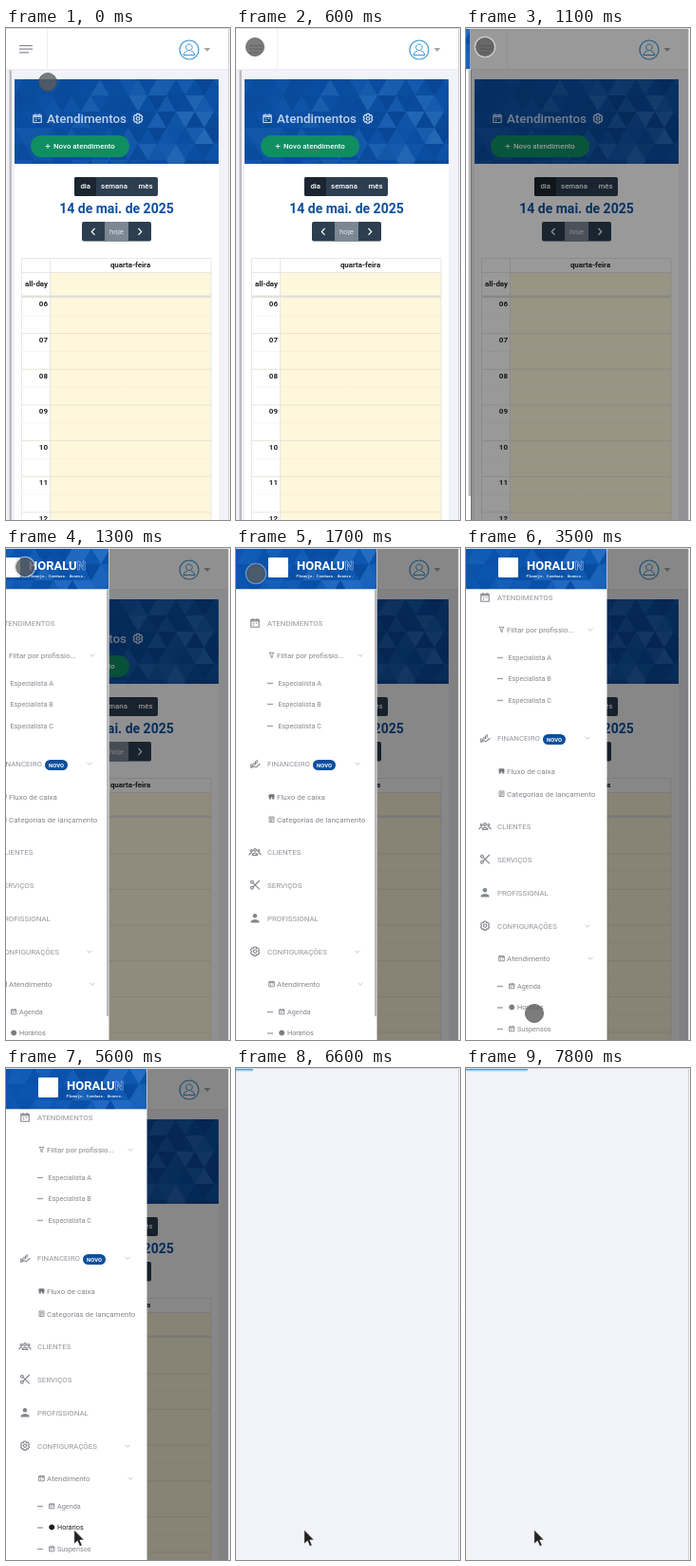
An HTML page that plays this animation: 236x518 px, repeating every 8 s.

```html
<!DOCTYPE html>
<html lang="pt-BR">
<head>
<meta charset="utf-8">
<title>Agenda</title>
<style>
  html, body { margin: 0; width: 100%; height: 100%; overflow: hidden; background: #f2f3f8; }
  svg { display: block; width: 100vw; height: 100vh; }
  text { font-family: Roboto, sans-serif; white-space: pre; }
</style>
</head>
<body>
<svg id="stage" viewBox="0 0 236 518" preserveAspectRatio="none">
  <defs>
    <clipPath id="screen"><rect y="1" width="234" height="517"/></clipPath>
    <clipPath id="heroClip"><rect x="9" y="54" width="215" height="89"/></clipPath>
    <clipPath id="brandClip"><rect width="148" height="43.5"/></clipPath>
  </defs>
  <rect width="236" height="518" fill="#f2f3f8"/>
  <g clip-path="url(#screen)">
    <g id="app">
      <g id="page"></g>
      <rect id="shade" width="234" height="518"/>
      <g id="sidebar">
        <rect width="148.5" height="518" fill="#fff"/>
        <g id="menu"></g>
        <g id="brand" clip-path="url(#brandClip)"></g>
        <rect id="thumb" x="146" y="44" width="2.5" height="449" fill="#b9babd"/>
      </g>
    </g>
    <g id="loader">
      <rect id="bar" y="1" height="1.6" fill="#4f9bd6"/>
      <rect id="glow" y="2.6" height="1" fill="#c3dcf0"/>
    </g>
    <g id="touch">
      <circle r="9.5" fill="#5c5c5c" stroke="#4a4a4a"/>
      <circle id="ring" r="10.6" fill="none" stroke="#d4d8dc" stroke-width="1.4"/>
    </g>
    <path id="arrow" d="M71.7 486v15.4l3.6-3.3 2.4 5.6 2.6-1.1-2.4-5.5h4.6z" fill="#222" stroke="#fff" stroke-width=".8"/>
  </g>
  <path d="M0 .5H236" stroke="#dcdcde"/>
  <path d="M234.5 0V518" stroke="#d2d2d6"/>
  <path d="M235.5 0V518" stroke="#f4f4f6"/>
</svg>
<script>
const $ = id => document.getElementById(id);
const page = $('page'), menu = $('menu'), brand = $('brand');

function add(parent, tag, attrs, content) {
  const el = document.createElementNS('http://www.w3.org/2000/svg', tag);
  for (const key in attrs) el.setAttribute(key, attrs[key]);
  if (content) el.textContent = content;
  parent.append(el);
  return el;
}
const rect = (parent, x, y, width, height, fill, more) =>
  add(parent, 'rect', { x, y, width, height, fill, ...more });
const line = (parent, d, stroke, width = 1, more) =>
  add(parent, 'path', { d, stroke, fill: 'none', 'stroke-width': width, ...more });
const label = (parent, x, y, size, fill, str, more) =>
  add(parent, 'text', { x, y, 'font-size': size, fill, ...more }, str);
const BOLD = { 'font-weight': 700 }, MEDIUM = { 'font-weight': 500 };
const MIDDLE = { 'text-anchor': 'middle' }, END = { 'text-anchor': 'end' };

// Outline icons in a 10 x 10 box; solid ones are filled.
const ICONS = {
  calendar: { d: 'M1 2H9V9.3H1ZM1 3.4H9M3 .5V2M7 .5V2M3 5.5H4.4M5.8 5.5H7.2M3 7.4H4.4' },
  funnel: { d: 'M1.5 1.5H8.5L6 5V9L4 8V5Z' },
  chart: { d: 'M1 5.5V9M4 4V7M7 1.5V5M.5 9.5L4 8L6 9L10 5.5M2.5 6V8M5.5 3V6.5' },
  shop: { d: 'M1 1.5H9V3L10 5H9V9H6V6H4V9H1V5H0L1 3Z', solid: true },
  list: { d: 'M1.5 1H8.5V9H1.5ZM3 3.5H7M3 5.2H7M3 7H5.5' },
  people: { d: 'M5 2A1.3 1.3 0 1 0 5.1 2M1.4 3A1 1 0 1 0 1.5 3M8.6 3A1 1 0 1 0 8.7 3M2.5 8.5V7.5Q5 5 7.5 7.5V8.5ZM-.7 8.5V7.5Q.6 6 2 6.5M10.7 8.5V7.5Q9.4 6 8 6.5' },
  scissors: { d: 'M2 .8A1.3 1.3 0 1 0 2.1 .8M2 6.6A1.3 1.3 0 1 0 2.1 6.6M3 3L9.6 9.5M3 7.2L9.6 .5' },
  person: { d: 'M5 .5A2.2 2.2 0 1 1 4.9 .5M.8 9.5V8Q5 4.6 9.2 8V9.5Z', solid: true },
  gear: { d: 'M4 .5H6L6.4 2L7.8 1.6L9.3 3.6L8.4 5L9.3 6.4L7.8 8.4L6.4 8L6 9.5H4L3.6 8L2.2 8.4L.7 6.4L1.6 5L.7 3.6L2.2 1.6L3.6 2ZM5 3.4A1.6 1.6 0 1 0 5.1 3.4' },
  clock: { d: 'M5 .5A4.5 4.5 0 1 0 5.1 .5', solid: true },
};
function icon(parent, name, cx, cy, size, color) {
  const { d, solid } = ICONS[name], k = size / 10;
  return add(parent, 'path', {
    d, fill: solid ? color : 'none', stroke: solid ? 'none' : color, 'stroke-width': 1.1,
    transform: `translate(${cx - size / 2} ${cy - size / 2}) scale(${k})`,
  });
}
const chevron = (parent, x, y) => line(parent, `M${x - 2.6} ${y - 1.3}l2.6 2.6 2.6-2.6`, '#b4b6bc', .8);

// Blue panel covered with seeded translucent triangles.
function triangles(parent, x, y, width, height, seed, color) {
  rect(parent, x, y, width, height, color);
  const random = () => (seed = seed * 16807 % 2147483647) / 2147483647;
  const w = 20, h = 17;
  for (let row = 0; row * h < height; row++) {
    for (let col = -1; col * w / 2 < width; col++) {
      const up = (row + col) % 2 === 0;
      const left = x + col * w / 2, top = y + row * h + (up ? h : 0);
      const light = random() < .55, strength = random() * (.04 + .1 * col * w / 2 / width);
      add(parent, 'path', {
        d: `M${left} ${top}h${w}l${-w / 2} ${up ? -h : h}z`,
        fill: light ? '#7fc0ff' : '#00245f', 'fill-opacity': Math.max(0, strength) * 1.8,
      });
    }
  }
}

function buildPage() {
  rect(page, 0, 0, 234, 518, '#f2f3f8');
  rect(page, 3.5, 44, 2.5, 474, '#bdbdc1');
  rect(page, 0, 0, 234, 43.5, '#fff');
  line(page, 'M0 44H234', '#e6e7ec');
  line(page, 'M43.5 0V43', '#eeeff3');
  line(page, 'M14 18.6H28M14 22.2H28M14 25.8H24', '#8b8f96', 1.3);
  add(page, 'circle', { cx: 193, cy: 23, r: 10, fill: '#fff', stroke: '#3c9ad6', 'stroke-width': 1.2 });
  line(page, 'M193 17a3.3 3.3 0 1 1-.1 0M187 28.5q1-4 4-4.4M199 28.5q-1-4-4-4.4M187 28.5h12', '#3c9ad6');
  add(page, 'path', { d: 'M208.500 21h7l-3.500 4z', fill: '#a6a8ae' });

  const hero = add(page, 'g', { 'clip-path': 'url(#heroClip)' });
  triangles(hero, 9, 54, 215, 89, 4711, '#0b4fa3');
  icon(hero, 'calendar', 33, 95, 10.5, '#c3d5ee');
  label(hero, 43, 100, 13.4, '#bfd2ee', 'Atendimentos', MEDIUM);
  icon(hero, 'gear', 139, 95.3, 11, '#d5e2f4');
  rect(hero, 26, 113, 104, 23, '#0f8e62', { rx: 11.5 });
  line(hero, 'M41.500 124.500h5M44 122v5', '#fff', .8);
  label(hero, 50, 127.3, 7.9, '#fff', 'Novo atendimento', MEDIUM);

  rect(page, 9, 143, 215, 375, '#fff');
  rect(page, 72, 157, 88, 20, '#2c3e50', { rx: 2 });
  rect(page, 72, 157, 23, 20, '#1a252f', { rx: 2 });
  [['dia', 83.7], ['semana', 114], ['mês', 147]].forEach(([name, x]) =>
    label(page, x, 169.3, 7.8, '#fff', name, { ...MEDIUM, ...MIDDLE }));
  label(page, 116.5, 195, 14, '#0d4f9f', '14 de mai. de 2025', { ...BOLD, ...MIDDLE });
  rect(page, 80, 204, 73, 20.5, '#2c3e50', { rx: 2 });
  rect(page, 104, 204, 25, 20.5, '#7b8793');
  label(page, 116.5, 217, 8, '#e4e7ea', 'hoje', MIDDLE);
  line(page, 'M93.500 211l-3.200 3.400 3.200 3.400M139.500 211l3.200 3.400-3.200 3.400', '#fff', 1.2);

  rect(page, 46.5, 257, 169.5, 261, '#fff7dc');
  label(page, 131, 252.3, 7.9, '#222', 'quarta-feira', { ...BOLD, ...MIDDLE });
  label(page, 44, 272, 7.9, '#222', 'all-day', { ...BOLD, ...END });
  line(page, 'M16.500 518V242.500H216V518M46.500 242V518M16 257.500H216', '#e3e3e3', .8);
  rect(page, 16.5, 281.5, 199.5, 2.5, '#e2e1da');
  for (let i = 0; i < 7; i++) {
    const y = 284 + i * 37.65;
    if (i) line(page, `M16.500 ${y}H216`, '#e3e0d2', .8);
    line(page, `M16.500 ${y + 18.8}H216`, '#e9e5d5', .7, { 'stroke-dasharray': '1 1' });
    label(page, 44, y + 9.2, 8, '#222', String(6 + i).padStart(2, '0'), { ...BOLD, ...END });
  }
}

const GREY = '#93959c';
let hoverParts;
function buildMenu() {
  const sections = [
    ['ATENDIMENTOS', 79, 'calendar'], ['FINANCEIRO', 227, 'chart', true], ['CLIENTES', 320, 'people'],
    ['SERVIÇOS', 355, 'scissors'], ['PROFISSIONAL', 390, 'person'], ['CONFIGURAÇÕES', 425, 'gear', true],
  ];
  for (const [name, y, glyph, opens] of sections) {
    icon(menu, glyph, 20, y - .3, 10.5, '#85878e');
    label(menu, 33, y + 2.9, 7.9, GREY, name);
    if (opens) chevron(menu, 128, y);
  }
  rect(menu, 81, 223, 24, 11, '#0d4f9f', { rx: 5.5 });
  label(menu, 93, 230.6, 5.8, '#fff', 'NOVO', { ...BOLD, ...MIDDLE });

  const groups = [
    ['Filtar por profissio...', 113, 'funnel', true], ['Fluxo de caixa', 262, 'shop'],
    ['Categorias de lançamento', 286, 'list'], ['Atendimento', 459, 'calendar', true],
  ];
  for (const [name, y, glyph, opens] of groups) {
    icon(menu, glyph, 37.5, y - .2, 7, '#74767d');
    label(menu, 43, y + 2.9, 8, '#85878e', name);
    if (opens) chevron(menu, 131, y);
  }

  const leaves = [
    ['Especialista A', 142], ['Especialista B', 164], ['Especialista C', 187],
    ['Agenda', 488, 'calendar'], ['Horários', 510.5, 'clock'], ['Suspensos', 533, 'calendar'],
  ];
  for (const [name, y, glyph] of leaves) {
    line(menu, `M33 ${y + .5}h6`, '#a0a2a8', 1.4);
    const mark = glyph && icon(menu, glyph, 48.2, y, 6.6, '#6d6f76');
    const text = label(menu, glyph ? 54 : 44.5, y + 2.7, 7.25, '#85878e', name);
    if (name === 'Horários') hoverParts = [mark, text];
  }
}

function buildBrand() {
  triangles(brand, 0, 0, 148.5, 43.5, 907, '#0b55b0');
  rect(brand, 34, 10, 21, 21, '#fff', { rx: 1 });
  label(brand, 64, 23, 13, '#fff', 'HORALU', BOLD);
  label(brand, 114.7, 23, 13, 'none', 'N', { ...BOLD, stroke: '#a9c9ee', 'stroke-width': .6 });
  label(brand, 63.5, 31, 4, '#e2edfa', 'Planeje. Conduza. Avance.',
    { ...BOLD, style: 'font-family:"Noto Sans Mono",monospace' });
}

// Rows are [time, value, ...]; values between rows are interpolated.
const TRACKS = {
  touch: [[0, 44, 57], [100, 42, 54], [300, 32, 38], [500, 22, 23], [600, 20, 20], [1600, 20, 20],
    [1700, 21, 27], [1800, 31, 105], [1900, 48, 280], [2000, 59, 435], [2100, 63, 500],
    [2300, 63, 500], [2400, 63, 450], [2500, 62, 375], [2600, 62, 335], [2800, 62, 335],
    [2900, 62, 343], [3100, 65, 400], [3300, 70, 465], [3500, 72, 490]],
  pressed: [[0, .8], [3900, .8], [4000, .9], [4100, .8]],
  ring: [[0, 0], [1000, 0], [1100, 1], [1700, .6], [1800, 0]],
  shade: [[1000, 0], [1100, .4], [1500, .47]],
  sidebar: [[1000, -152], [1100, -143.5], [1200, -88], [1300, -40], [1400, -11], [1500, 0]],
  scroll: [[2300, 0], [2400, 12], [2500, 23], [2600, 27]],
  thumb: [[2900, 1], [3500, 0]],
  hover: [[4600, 0], [4700, .3], [4900, .6], [5100, 1]],
  bar: [[6600, 18], [6800, 30], [7100, 30], [7200, 42], [7400, 42], [7500, 48], [7800, 65]],
};
function at(name, t) {
  const rows = TRACKS[name], next = rows.findIndex(row => row[0] > t);
  if (next === 0) return rows[0].slice(1);
  if (next < 0) return rows[rows.length - 1].slice(1);
  const a = rows[next - 1], b = rows[next], k = (t - a[0]) / (b[0] - a[0]);
  return a.slice(1).map((value, i) => value + (b[i + 1] - value) * k);
}
const show = (id, on) => $(id).setAttribute('visibility', on ? 'visible' : 'hidden');

function draw(t) {
  const loading = t >= 6600, pointer = t >= 4700;
  show('app', !loading);
  show('loader', loading);
  show('touch', !pointer);
  show('arrow', pointer);
  $('touch').setAttribute('transform', `translate(${at('touch', t)})`);
  $('touch').setAttribute('opacity', at('pressed', t));
  $('ring').setAttribute('opacity', at('ring', t));
  $('shade').setAttribute('opacity', at('shade', t));
  $('sidebar').setAttribute('transform', `translate(${at('sidebar', t)})`);
  const [scroll] = at('scroll', t);
  menu.setAttribute('transform', `translate(0 ${-scroll})`);
  $('thumb').setAttribute('y', 44 + scroll * 25 / 27);
  $('thumb').setAttribute('opacity', at('thumb', t));
  const grey = Math.round(125 - 95 * at('hover', t)[0]);
  hoverParts.forEach(part => part.setAttribute('fill', `rgb(${grey},${grey},${grey})`));
  for (const id of ['bar', 'glow']) $(id).setAttribute('width', at('bar', t)[0]);
}

buildPage();
buildMenu();
buildBrand();
const LOOP = 8000, STEP = 100, start = performance.now();
function tick() {
  const t = (performance.now() - start) % LOOP;
  draw(Math.floor(t / STEP) * STEP);
  requestAnimationFrame(tick);
}
tick();
</script>
</body>
</html>
```
